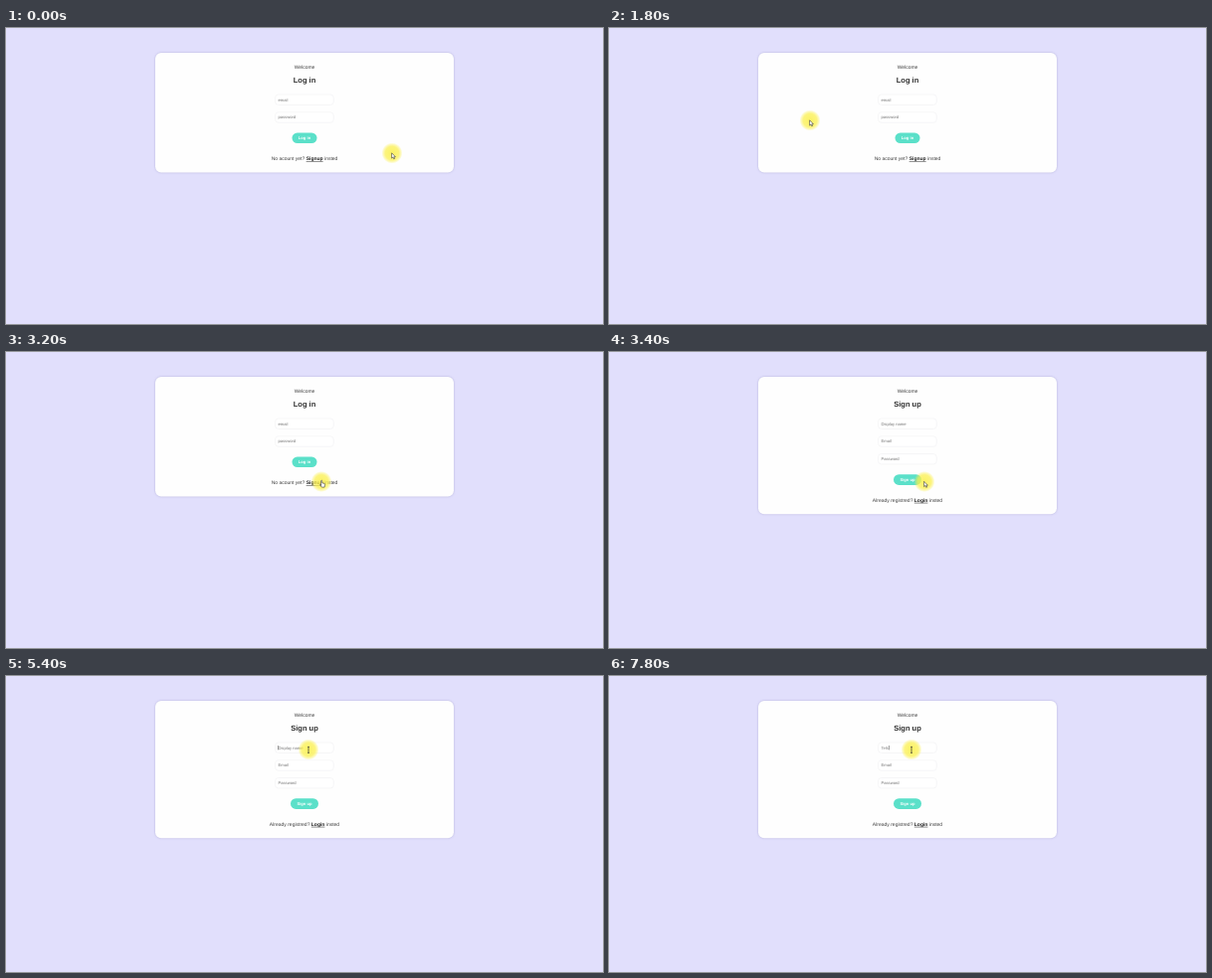
An HTML page for the animation above (8000 ms loop, 600 px wide and 298 px high).

```html
<!DOCTYPE html>
<html lang="en">
<head>
<meta charset="utf-8">
<title>Login and sign up</title>
<style>
html, body { margin: 0; width: 100%; height: 100%; overflow: hidden; background: #e1dffc; }
svg { display: block; width: 100vw; height: 100vh; }
text { font: 5px "Liberation Sans", Arial, sans-serif; fill: #404040; text-anchor: middle; text-rendering: geometricPrecision; }
.title { font-size: 7.5px; font-weight: 700; fill: #2d2d2d; }
.hint { font-size: 4.17px; fill: #757575; text-anchor: start; }
.action { font-size: 4.17px; font-weight: 700; fill: #fff; }
.link { font-weight: 700; text-decoration: underline; fill: #222; }
.card { fill: #fefefe; filter: drop-shadow(0 .8px .8px rgba(70, 65, 130, .27)); }
.field { fill: #fff; stroke: #f0f0f2; stroke-width: .6; }
.button { fill: #5be0c9; }
.pointer { fill: #fff; stroke: #2b2b2b; stroke-width: .55; stroke-linejoin: round; }
</style>
</head>
<body>
<svg id="stage" viewBox="0 0 600 298">
  <defs>
    <radialGradient id="glow">
      <stop offset="0" stop-color="#fbf04a" stop-opacity=".85"/>
      <stop offset=".65" stop-color="#fbf04a" stop-opacity=".72"/>
      <stop offset=".85" stop-color="#fbf04a" stop-opacity=".35"/>
      <stop offset="1" stop-color="#fbf04a" stop-opacity="0"/>
    </radialGradient>
  </defs>
  <g id="forms"></g>
  <g id="cursor">
    <circle r="10.5" fill="url(#glow)"/>
    <path id="arrow" class="pointer" d="M-.4-.2V5.1L.9 4 1.8 5.9 2.6 5.5 1.8 3.7H3.4Z"/>
    <path id="hand" class="pointer" d="M-.4 4V-.9Q.2-1.8.8-.9V1.4L3 1.9Q3.7 2.2 3.6 3L3.1 5.6H.3L-1.6 3.1Q-1.5 2.3-.4 3.2Z"/>
    <path id="beam" d="M-1-2.8Q0-2.8 0-2Q0-2.8 1-2.8M0-2V2.8M-1 3.6Q0 3.6 0 2.8Q0 3.6 1 3.6" fill="none" stroke="#333" stroke-width=".7"/>
  </g>
</svg>
<script>
const LOOP = 8000, STEP = 200;
const byId = id => document.getElementById(id);
const show = (node, on) => node.setAttribute("visibility", on ? "visible" : "hidden");

function form(id, title, hints, action, question, link) {
  const shift = (hints.length - 2) * 17.8;
  const half = action === "Log in" ? 12.5 : 14;
  const fields = hints.map((hint, i) => {
    const y = 67 + i * 17.8;
    return `<rect class="field" x="270.6" y="${y}" width="58.6" height="10.4" rx="3.2"/>
      <text class="hint" x="273.4" y="${y + 6.6}">${hint}</text>`;
  }).join("");
  return `<g id="${id}">
    <rect class="card" x="150" y="25" width="300" height="${120.5 + shift}" rx="6"/>
    <text x="300" y="40.7">Welcome</text>
    <text class="title" x="300" y="55.1">${title}</text>
    ${fields}
    <rect class="button" x="${300 - half}" y="${105.4 + shift}" width="${half * 2}" height="10.7" rx="5.3"/>
    <text class="action" x="300" y="${112.2 + shift}">${action}</text>
    <text x="300" y="${133 + shift}">${question} <tspan class="link">${link}</tspan> insted</text>
  </g>`;
}

byId("forms").innerHTML =
  form("login", "Log in", ["email", "password"], "Log in", "No acount yet?", "Signup") +
  form("signup", "Sign up", ["Display name", "Email", "Password"], "Sign up", "Already registred?", "Login") +
  `<rect id="caret" y="70" width=".5" height="4.4" fill="#444"/>`;

// Pointer stops: [time, x, y]
const path = [
  [0, 388, 126], [800, 399, 108], [1000, 374, 78], [1200, 342, 62],
  [1400, 288, 37], [1600, 222, 52], [1800, 202, 93],
  [2000, 211, 122], [2200, 232, 142], [2400, 259, 148], [2600, 286, 151],
  [2800, 307, 141], [3000, 317, 131], [3200, 317, 130.5],
  [3800, 313, 106], [4000, 308, 82], [4200, 305, 75.5], [4400, 304, 74]
];
// Typed text and caret: [time, text, caret x or 0]
const typing = [
  [0, "", 0], [5000, "", 273.1], [5600, "T", 276.1], [6000, "Te", 278.3],
  [6400, "Tel", 279.4], [6800, "Telk", 281.4], [7200, "Telk", 0], [7800, "Telk", 281.4]
];
const at = (table, time) => table.filter(row => row[0] <= time).pop();
const nameField = document.querySelector("#signup .hint");

function draw(now) {
  const time = Math.floor(now % LOOP / STEP) * STEP;
  const [, x, y] = at(path, time);
  const [, typed, caretX] = at(typing, time);
  const signingUp = time >= 3400;
  show(byId("login"), !signingUp);
  show(byId("signup"), signingUp);

  byId("cursor").setAttribute("transform", `translate(${x} ${y})`);
  const overLink = time >= 3000 && time < 3400;
  const overField = time >= 4200;
  show(byId("arrow"), !overLink && !overField);
  show(byId("hand"), overLink);
  show(byId("beam"), overField);

  nameField.textContent = typed || "Display name";
  nameField.style.fill = typed ? "#858585" : "";
  byId("caret").setAttribute("x", caretX);
  show(byId("caret"), caretX > 0);
}

const start = performance.now();
function tick() {
  draw(performance.now() - start);
  requestAnimationFrame(tick);
}
tick();
</script>
</body>
</html>
```
